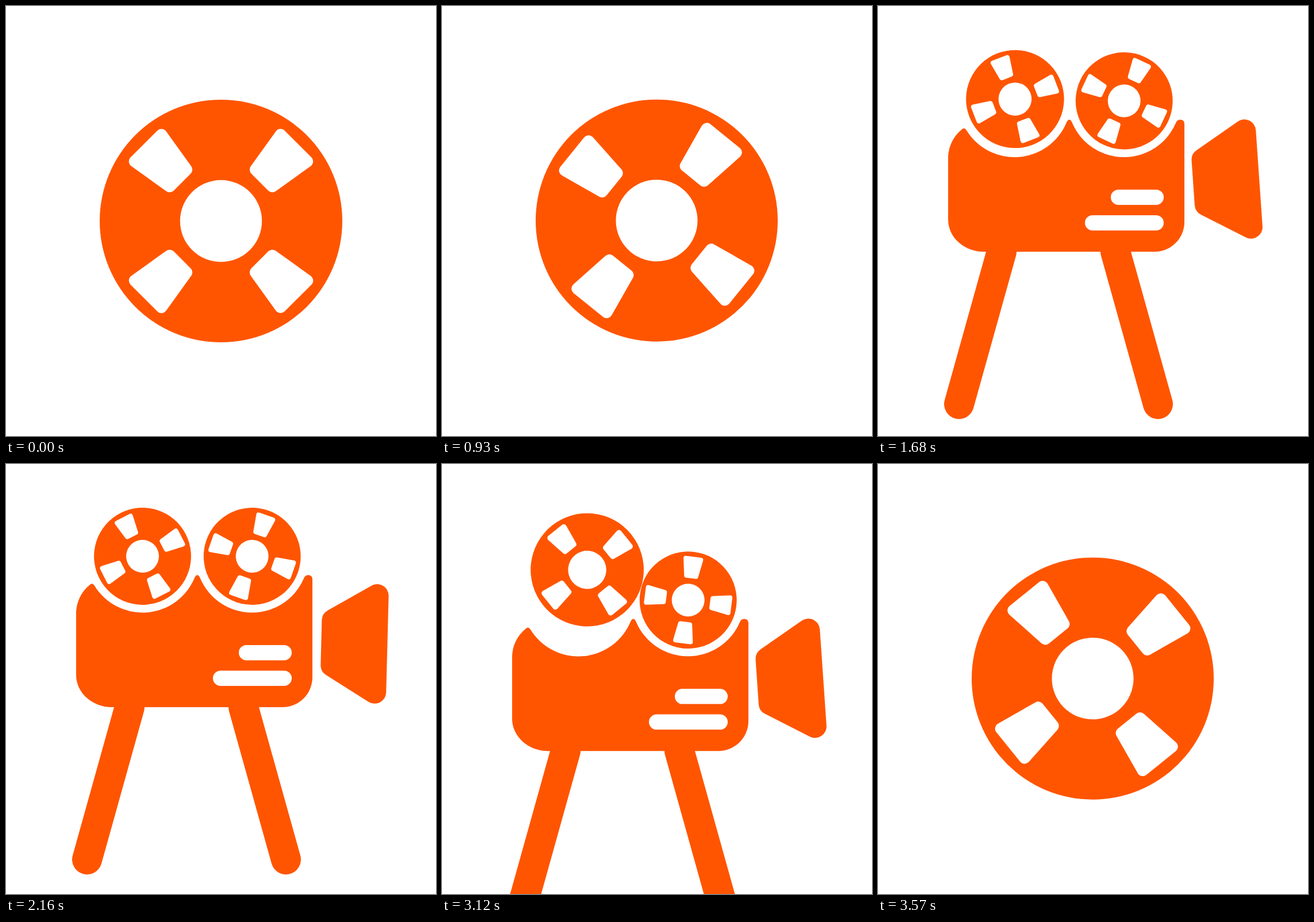
Recreate the animation shown at these times as an HTML page. Size 748x748 px, loop 3600 ms.

```html
<!DOCTYPE html>
<html lang="en">
<head>
<meta charset="utf-8">
<title>Film camera</title>
<style>
  html, body { margin: 0; height: 100%; overflow: hidden; background: #fff; }
  svg { display: block; width: 100vw; height: 100vh; fill: #ff5500; stroke-linejoin: round; stroke-linecap: round; }
  .window { fill: #fff; stroke: #fff; stroke-width: 20; }
  .leg { stroke: #ff5500; stroke-width: 52; }
  .slot { stroke: #fff; stroke-width: 26.5; }
  .lens { stroke: #ff5500; stroke-width: 40; }
</style>
</head>
<body>
<svg viewBox="0 0 748 748">
  <defs>
    <path id="window" class="window" d="M105.5-20.8 179.5-33V33L105.5 20.8Z"/>
    <g id="reel">
      <circle r="211"/>
      <circle r="71.2" fill="#fff"/>
      <use href="#window" transform="rotate(45)"/>
      <use href="#window" transform="rotate(135)"/>
      <use href="#window" transform="rotate(225)"/>
      <use href="#window" transform="rotate(315)"/>
    </g>
  </defs>
  <g id="camera">
    <path class="leg" d="M215 423 141 688M413 423 487 688"/>
    <path d="M122 262A64 64 0 0 1 146 210Q150 206 153.5 211A98 98 0 0 0 328 198
      Q330 193.3 332.8 193.3T337.5 198A98 98 0 0 0 518.5 198Q520.5 193.3 526 193.3
      Q533 193.3 533 201V371A52 52 0 0 1 481 423H184A62 56 0 0 1 122 367Z"/>
    <path class="slot" d="M418.2 328.2H483.8M373.2 372.7H483.8"/>
    <path id="lens" class="lens" d="M568.4 269.5 643.5 224.6V392.4L568.4 347.5Z"/>
    <use id="rightReel" href="#reel"/>
  </g>
  <use id="leftReel" href="#reel"/>
</svg>
<script>
const LOOP = 3600, STEP = 30, MOVE = 900, SWING = 600;
const [camera, lens, rightReel, leftReel] =
  ["camera", "lens", "rightReel", "leftReel"].map(id => document.getElementById(id));

const clamp = x => Math.max(0, Math.min(1, x));
const mix = (a, b, k) => a + (b - a) * k;
const smooth = s => s * s * (3 - 2 * s);

// cubic-bezier(1/3, 0, 0, 1), solved by bisection
function ease(x) {
  if (x <= 0 || x >= 1) return clamp(x);
  let low = 0, high = 1;
  for (let i = 0; i < 30; i++) {
    const s = (low + high) / 2;
    if (s * (1 - s) ** 2 + s ** 3 < x) low = s; else high = s;
  }
  return smooth(low);
}

function place(el, x, y, angle, scale) {
  el.setAttribute("transform", `translate(${x} ${y}) rotate(${angle}) scale(${scale})`);
}

function draw(t) {
  const spin = -720 * t / LOOP;
  const p = ease(clamp(Math.min(t - MOVE, LOOP - t) / MOVE));
  const swing = mix(5, -5, smooth(Math.abs((t + SWING) % (2 * SWING) - SWING) / SWING));

  place(leftReel, mix(374, 237.5, p), mix(374, 160.5, p), spin, mix(1, 0.4, p));
  place(rightReel, 428.2, 160.5, spin + 46.2, 0.4);
  lens.setAttribute("transform", `rotate(${swing} 470 308.5)`);
  camera.setAttribute("transform", `translate(0 ${690 * (1 - p)})`);
}

const start = performance.now();
function tick() {
  const t = (performance.now() - start) % LOOP;
  draw(Math.floor(t / STEP) * STEP);
  requestAnimationFrame(tick);
}
tick();
</script>
</body>
</html>
```
